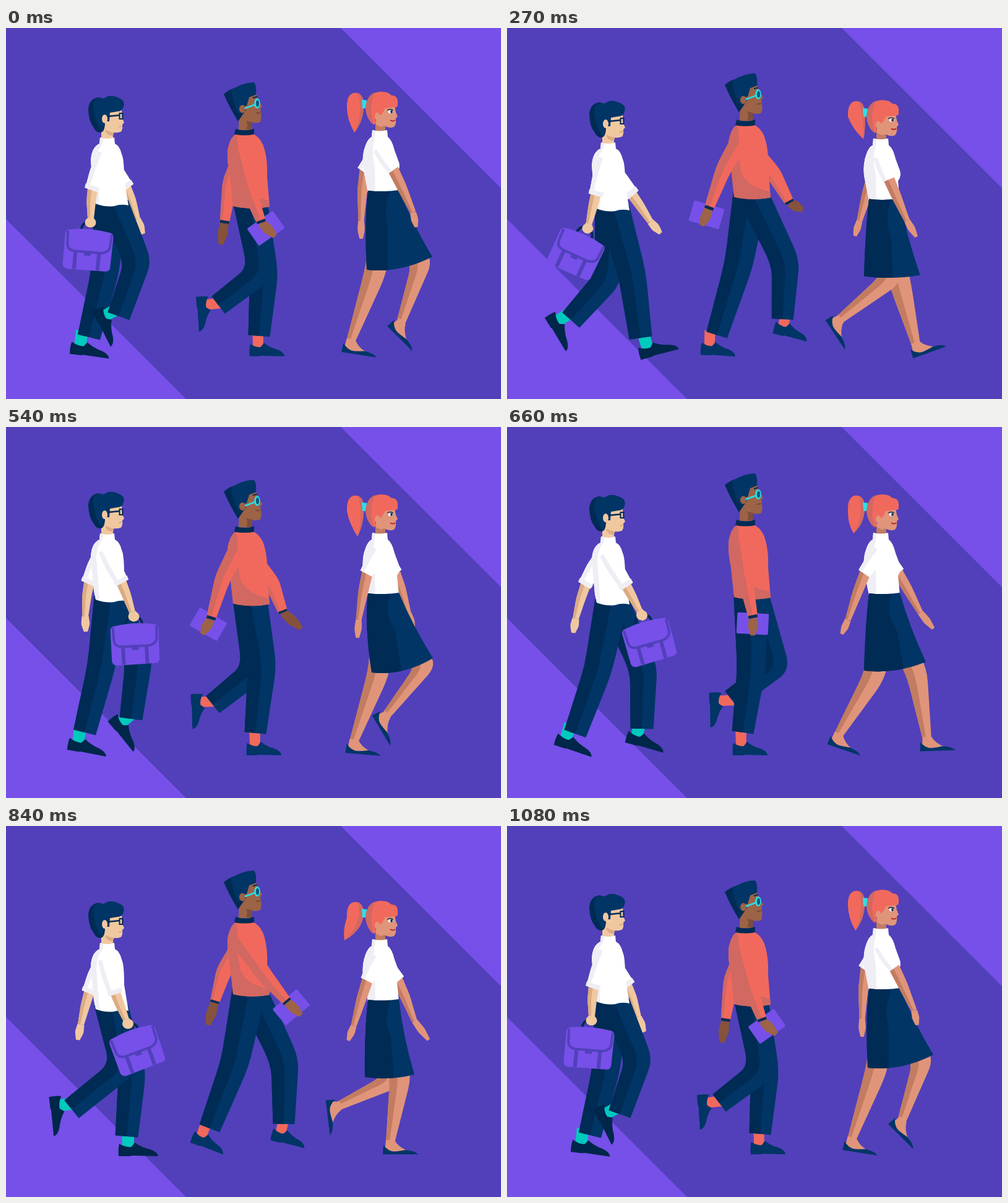
These frames come from a looping animation (800x600 px, 1.11 s). An HTML page with a canvas:

```html
<!DOCTYPE html>
<html lang="en">
<head>
<meta charset="utf-8">
<title>Walkers</title>
<style>
html, body { margin: 0; width: 100%; height: 100%; overflow: hidden; background: #5140ba; }
canvas { display: block; width: 800px; height: 600px; }
</style>
</head>
<body>
<canvas id="stage" width="800" height="600"></canvas>
<script>
const ctx = document.getElementById('stage').getContext('2d');
const STEP = 30, LOOP = 1110, CYCLE = 1080;
const TIMES = [0, 150, 390, 540, 660, 840];
const NAVY = '#003566', DARK = '#002b55', CORAL = '#f1695d', CORAL_DIM = '#d16862';
const VIOLET = '#7650e9', BG = '#5140ba', WHITE = '#ffffff', GREY = '#efeef4', CYAN = '#2ae0e8';

// Leg rows: knee x y, hem x y, ankle x y, foot angle
// Arm rows: elbow x y, wrist x y, fingertip x y
const man = {
  bob: [[0], [3], [9], [-5], [0], [12]],
  near: [
    [213, 378, 182, 466, 169, 460, 62], [210, 388, 238, 493, 248, 496, -11],
    [187, 403, 170, 501, 168, 508, 0], [154, 388, 127, 494, 118, 499, 10],
    [147, 393, 110, 496, 98, 494, 18], [188, 392, 106, 458, 97, 450, 83]],
  far: [
    [160, 395, 134, 500, 121, 503, 7], [148, 393, 110, 497, 97, 494, 18],
    [186, 412, 122, 453, 111, 449, 86], [215, 376, 202, 472, 194, 471, 50],
    [221, 391, 218, 488, 212, 489, 15], [204, 400, 195, 502, 197, 508, 0]],
  nearArm: [
    [138, 262, 137, 308, 136, 321], [137, 263, 126, 309, 122, 324],
    [157, 273, 154, 319, 152, 334], [188, 252, 204, 299, 209, 314],
    [194, 258, 214, 297, 222, 312], [177, 272, 194, 313, 200, 327]],
  farArm: [
    [197, 259, 212, 309, 222, 333], [202, 260, 236, 302, 253, 320],
    [190, 275, 203, 322, 215, 344], [132, 253, 128, 306, 129, 331],
    [125, 256, 111, 310, 107, 333], [133, 270, 121, 321, 116, 346]],
  bag: [[5], [27], [13], [-3], [-16], [-20]]
};
const tall = {
  bob: [[0], [-14], [-10], [-2.5], [-13], [-16]],
  near: [
    [411, 396, 343, 448, 334, 446, 85], [452, 376, 396, 447, 386, 447, 65],
    [434, 388, 466, 495, 479, 498, -27], [414, 388, 403, 495, 402, 505, 0],
    [395, 392, 381, 494, 378, 505, 0], [370, 383, 329, 489, 319, 492, 20]],
  far: [
    [417, 398, 409, 498, 407, 505, 0], [389, 390, 366, 494, 359, 504, 0],
    [374, 380, 325, 490, 311, 491, 22], [402, 395, 334, 449, 325, 444, 87],
    [436, 386, 363, 441, 353, 442, 88], [451, 381, 449, 482, 446, 486, 13]],
  nearArm: [
    [391, 256, 413, 315, 435, 337], [362, 235, 354, 303, 355, 331],
    [346, 230, 316, 291, 299, 315], [350, 245, 331, 311, 317, 335],
    [384, 240, 398, 309, 397, 337], [420, 244, 455, 285, 477, 306]],
  farArm: [
    [362, 250, 353, 316, 347, 350], [415, 240, 429, 296, 432, 309],
    [433, 237, 463, 280, 498, 297], [430, 252, 448, 300, 477, 326],
    [390, 240, 388, 290, 388, 312], [352, 235, 337, 286, 326, 322]],
  tablet: [[420, 324, -35], [354, 313, -9], [311, 299, 34], [327, 319, 30], [397, 318, 3], [461, 293, -40]]
};
const woman = {
  bob: [[0], [10], [13], [6], [6], [18]],
  near: [
    [597, 395, 557, 507, 557, 507, 9], [586, 402, 523, 499, 523, 499, 20],
    [664, 402, 570, 451, 570, 451, 84], [680, 384, 614, 467, 614, 467, 59],
    [662, 395, 679, 505, 679, 505, -2], [638, 405, 621, 512, 621, 512, 0]],
  far: [
    [673, 378, 638, 477, 638, 477, 45], [656, 410, 702, 505, 702, 505, -22],
    [616, 408, 596, 512, 596, 512, 0], [602, 398, 562, 509, 562, 509, 5],
    [594, 402, 535, 499, 535, 499, 19], [625, 412, 537, 453, 537, 453, 83]],
  nearArm: [
    [627, 229, 658, 298, 663, 322], [630, 239, 674, 302, 695, 324],
    [600, 246, 606, 318, 610, 349], [582, 237, 570, 312, 568, 341],
    [577, 237, 551, 312, 541, 335], [583, 250, 562, 323, 553, 347]],
  farArm: [
    [577, 232, 574, 312, 574, 341], [576, 238, 547, 312, 536, 342],
    [607, 246, 609, 310, 610, 330], [631, 237, 650, 300, 659, 327],
    [633, 236, 668, 300, 689, 326], [635, 250, 660, 315, 683, 346]],
  // hem left, hem right, shade line at hem
  skirt: [
    [583, 391, 689, 370, 617], [568, 396, 668, 393, 611], [590, 404, 676, 395, 640],
    [591, 397, 690, 374, 642], [577, 394, 677, 380, 644], [580, 406, 660, 402, 628]],
  tail: [[563, 169], [572, 176], [576, 181], [568, 177], [560, 172], [547, 185]]
};

// Periodic cubic interpolation through the key poses
function at(rows, ms) {
  const n = TIMES.length;
  const time = i => TIMES[(i + n) % n] + Math.floor(i / n) * CYCLE;
  let k = n - 1;
  while (TIMES[k] > ms) k--;
  const row = i => rows[(i + n) % n];
  const h = time(k + 1) - time(k), u = (ms - time(k)) / h;
  return rows[0].map((_, c) => {
    const slope = i => (row(i + 1)[c] - row(i)[c]) / (time(i + 1) - time(i));
    const tangent = i => {
      const a = time(i) - time(i - 1), b = time(i + 1) - time(i);
      return (b * slope(i - 1) + a * slope(i)) / (a + b);
    };
    const p = row(k)[c], q = row(k + 1)[c], v = 1 - u;
    return p * (1 + 2 * u) * v * v + q * u * u * (3 - 2 * u)
      + h * u * v * (tangent(k) * v - tangent(k + 1) * u);
  });
}

function fill(path, color) {
  ctx.fillStyle = color;
  ctx.fill(typeof path === 'string' ? new Path2D(path) : path);
}
function line(path, color, width) {
  ctx.strokeStyle = color;
  ctx.lineWidth = width;
  ctx.stroke(new Path2D(path));
}
function oval(x, y, rx, ry, color) {
  ctx.beginPath();
  ctx.ellipse(x, y, rx, ry, 0, 0, 7);
  ctx.fillStyle = color;
  ctx.fill();
}
function placed(x, y, deg, draw) {
  ctx.save();
  ctx.translate(x, y);
  ctx.rotate(deg * Math.PI / 180);
  draw();
  ctx.restore();
}
const mix = (a, b, u) => [a[0] + (b[0] - a[0]) * u, a[1] + (b[1] - a[1]) * u];
function normal(a, b) {
  const dx = b[0] - a[0], dy = b[1] - a[1], d = Math.hypot(dx, dy) || 1;
  return [dy / d, -dx / d];
}

// Tapered three-point limb; from and to run from -0.5 (back) to 0.5 (front)
function limb(p, w, from, to, color, flatTop) {
  const n1 = normal(p[0], p[1]), n2 = normal(p[1], p[2]);
  const sum = [n1[0] + n2[0], n1[1] + n2[1]], d = Math.hypot(...sum) || 1;
  const ns = [flatTop ? [1, 0] : n1, [sum[0] / d, sum[1] / d], n2];
  const edge = s => p.map((q, i) => [q[0] + ns[i][0] * w[i] * s, q[1] + ns[i][1] * w[i] * s]);
  const a = edge(from), b = edge(to).reverse();
  ctx.beginPath();
  ctx.moveTo(...a[0]);
  for (const e of [a, b]) {
    ctx.lineTo(...e[0]);
    ctx.lineTo(...mix(e[0], e[1], 0.8));
    ctx.quadraticCurveTo(...e[1], ...mix(e[1], e[2], 0.2));
    ctx.lineTo(...e[2]);
  }
  ctx.fillStyle = color;
  ctx.fill();
}

const SHOE = 'M-14,6 Q-4,12 6,11 L11,4 Q22,12 36,15 Q48,19 49,26 L6,25 L4,26 L-15,26 Q-16,14 -14,6Z';
const SOCK = 'M-10,-14 L10,-14 L10,6 Q0,18 -9,9Z';

function leg(row, hip, look, shade) {
  const [kx, ky, hx, hy, ax, ay, deg] = row;
  const pts = [hip, [kx, ky], [hx, hy]];
  const trousers = () => {
    limb(pts, look.width, -0.5, 0.5, look.light, true);
    limb(pts, look.width, -0.5, shade, look.dark, true);
  };
  const foot = () => placed(ax, ay, deg, look.foot);
  if (look.bare) { trousers(); foot(); } else { foot(); trousers(); }
}

function hand(wrist, tip, color, width) {
  limb([wrist, mix(wrist, tip, 0.5), tip], [width * 0.8, width, width * 0.45], -0.5, 0.5, color);
}

// Short sleeve, bare forearm
function shortArm(row, shoulder, look) {
  const elbow = row.slice(0, 2), wrist = row.slice(2, 4), tip = row.slice(4);
  const start = mix(elbow, shoulder, 0.15), mid = mix(elbow, wrist, 0.4);
  const fore = [start, mid, wrist];
  limb(fore, look.fore, -0.5, 0.5, look.skin);
  limb(fore, look.fore, -0.5, -0.1, look.skinDim);
  hand(wrist, tip, look.skin, look.hand);
  const sleeve = [shoulder, mix(shoulder, elbow, 0.5), elbow];
  limb(sleeve, look.sleeve, -0.5, 0.5, WHITE);
  limb(sleeve, look.sleeve, -0.5, -0.2, GREY);
  if (look.cuff) {
    const top = mix(elbow, shoulder, 0.12);
    limb([top, mix(top, elbow, 0.5), elbow], [24, 24, 23], -0.5, 0.5, GREY);
  }
}

// Long sleeve with a dark cuff
function longArm(row, shoulder, skin, shade) {
  const elbow = row.slice(0, 2), wrist = row.slice(2, 4), tip = row.slice(4);
  hand(wrist, tip, skin, 17);
  const pts = [shoulder, elbow, wrist], w = [30, 25, 15];
  limb(pts, w, -0.5, 0.5, CORAL);
  limb(pts, w, -0.5, shade, CORAL_DIM);
  const top = mix(wrist, elbow, 0.07);
  limb([top, mix(top, wrist, 0.5), wrist], [15, 15, 15], -0.5, 0.5, DARK);
}

function shifted(dy, draw) { placed(0, dy, 0, draw); }

const manLeg = {
  width: [55, 45, 37], light: NAVY, dark: DARK,
  foot() { fill(SOCK, '#00c9bd'); fill(SHOE, '#00264a'); }
};
const tallLeg = {
  width: [56, 46, 35], light: NAVY, dark: DARK,
  foot() { ctx.scale(0.88, 1); fill(SOCK, CORAL); fill(SHOE, NAVY); }
};
const womanLeg = {
  width: [36, 35, 14], light: '#e0957a', dark: '#c27c62', bare: true,
  foot() {
    fill('M-7,-4 L7,-4 Q12,6 27,13 L-9,15Z', '#e0957a');
    fill('M-11,4 Q-4,14 8,15 L24,12 Q40,13 45,19 L-12,19Z', NAVY);
  }
};
const manArm = { sleeve: [22, 26, 21], fore: [17, 15, 10], hand: 14, skin: '#f0c8a0', skinDim: '#dbab84', cuff: true };
const womanArm = { sleeve: [20, 24, 21], fore: [18, 16, 9], hand: 12, skin: '#e0957a', skinDim: '#c27c62' };

function bag() {
  line('M-14,14 Q-13,0 -2,-1 Q12,0 13,14', DARK, 4);
  fill('M-32,14 Q0,8 33,14 Q39,15 39,22 L38,71 Q37,77 30,77 L-31,78 Q-38,77 -39,71 L-39,20 Q-38,14 -32,14Z', VIOLET);
  ctx.lineJoin = 'round';
  line('M-35,16 L-34,38 Q-33,47 -22,48 L22,48 Q33,46 35,38 L36,16', BG, 4);
  line('M-20,49 L-20,77 M18,49 L18,77', BG, 6);
  fill('M-6,47 h11 v7 h-11Z', BG);
}

function drawMan(ms) {
  const [dy] = at(man.bob, ms), arm = at(man.nearArm, ms);
  const hip = [170, 278 + dy];
  shortArm(at(man.farArm, ms), [156, 203 + dy], manArm);
  leg(at(man.far, ms), hip, manLeg, 0);
  leg(at(man.near, ms), hip, manLeg, 0);
  shifted(dy, () => {
    fill('M154,158 H173 V179 H154Z', '#f0c8a0');
    fill('M160,165 L175,168 L173,174 Q163,175 160,165Z', '#dbab84');
    fill('M152,177 Q164,181 175,177 L176,187 Q184,191 187,204 Q191,212 191,245 L198,287 Q186,284 175,288 Q160,290 145,284 L142,270 L137,215 Q138,193 151,187Z', WHITE);
    fill('M152,177 L157,178 L156,187 Q147,196 146,216 L151,286 L145,284 L142,270 L137,215 Q138,193 151,187Z', GREY);
    fill('M160,135 L187,133 L188,146 L191,153 L188,156 Q189,166 185,168 Q176,171 166,167 L157,157Z', '#f0c8a0');
    fill('M150,112 Q134,114 133,132 Q134,152 141,160 Q146,170 153,169 Q160,168 160,152 L165,138 L168,120Z', DARK);
    fill('M142,118 Q149,111 158,114 Q168,106 182,113 Q193,117 190,127 Q188,135 180,135 L168,137 L167,151 L159,151 Q157,160 156,168 Q145,156 143,138 Q139,128 142,118Z', NAVY);
    oval(159.5, 147, 4.5, 7, '#f0c8a0');
    line('M164,143 L184,141', DARK, 2.5);
    line('M183.5,138 H188.5 V147 H183.5Z', DARK, 2);
    line('M182,160 L187,159', '#c78f6d', 1.2);
  });
  const grip = mix(arm.slice(2, 4), arm.slice(4), 0.5);
  placed(...grip, at(man.bag, ms)[0], bag);
  shortArm(arm, [159, 203 + dy], manArm);
  oval(...grip, 9, 8, manArm.skin);
}

function drawTall(ms) {
  const [dy] = at(tall.bob, ms), hip = [394, 278 + dy];
  longArm(at(tall.farArm, ms), [385, 200 + dy], '#85523c', -0.25);
  leg(at(tall.far, ms), hip, tallLeg, 0);
  leg(at(tall.near, ms), hip, tallLeg, 0);
  shifted(dy, () => {
    fill('M371,172 H401 Q414,180 418,197 Q423,215 422,240 L426,289 Q396,295 367,288 L362,240 Q355,205 360,190 Q364,176 371,172Z', CORAL);
    fill('M371,172 Q377,182 373,215 L379,250 Q390,273 425,279 L426,289 Q396,295 367,288 L362,240 Q355,205 360,190 Q364,176 371,172Z', CORAL_DIM);
    fill('M388,112 L404,107 L408,117 L414,127 L411,131 Q414,145 411,152 Q404,155 395,152 L396,165 H376 L377,130 Q384,120 388,112Z', '#9c6347');
    fill('M388,150 L398,152 L397,165 L388,163 Q392,158 388,150Z', '#7f4e39');
    fill('M352,107 Q360,99 374,96 L388,132 L375,151 Q361,128 352,107Z', DARK);
    fill('M364,100 Q384,88 400,88 Q405,90 404,108 L393,112 L389,126 L381,126 L377,140 Q367,124 364,100Z', NAVY);
    oval(382, 131, 5, 6.5, '#9c6347');
    line('M399,113 L406,111', DARK, 2);
    line('M386,130 L402,124', CYAN, 2.5);
    oval(406, 122, 4.8, 8, CYAN);
    oval(406.5, 122, 2.6, 5.5, '#075b7c');
    line('M404,138 L411,137', '#70412f', 1.5);
    fill('M371,163 Q386,168 401,163 L401,172 Q386,175 369,172Z', DARK);
  });
  const [x, y, deg] = at(tall.tablet, ms);
  placed(x, y, deg, () => {
    ctx.beginPath();
    ctx.roundRect(-25.5, -17, 51, 34, 2);
    ctx.fillStyle = VIOLET;
    ctx.fill();
  });
  longArm(at(tall.nearArm, ms), [376, 198 + dy], '#9c6347', 0);
}

function skirt(ms, dy) {
  const [lx, ly, rx, ry, sx] = at(woman.skirt, ms), top = 263 + dy;
  const low = Math.max(ly, ry) + 6;
  const shape = new Path2D(`M585,${top} Q610,${top + 3} 635,${top - 1}
    Q${(635 + rx) / 2 - 6},${(top + ry) / 2 - 2} ${rx},${ry}
    Q${(lx + rx) / 2},${low} ${lx},${ly} Q579,${top + 52} 585,${top}Z`);
  fill(shape, NAVY);
  ctx.save();
  ctx.clip(shape);
  fill(`M560,${top - 5} H624 Q608,${top + 30} ${(616 + sx) / 2},${top + 60} L${sx},${low + 10} H560Z`, DARK);
  ctx.restore();
}

function drawWoman(ms) {
  const [dy] = at(woman.bob, ms), hip = [612, 300 + dy];
  const [tx, ty] = at(woman.tail, ms);
  shortArm(at(woman.farArm, ms), [604, 194 + dy], womanArm);
  leg(at(woman.far, ms), hip, womanLeg, -0.1);
  leg(at(woman.near, ms), hip, womanLeg, -0.1);
  const side = (tx + 551) / 2 - 5;
  fill(`M578,${118 + dy} Q573,${103 + dy} 562,${105 + dy} Q550,${108 + dy} 551,${130 + dy} Q${side},${150 + dy} ${tx},${ty} Q580,${148 + dy} 578,${118 + dy}Z`, CORAL);
  fill(`M578,${118 + dy} Q576,${108 + dy} 569,${105 + dy} Q578,${138 + dy} ${tx},${ty} Q580,${148 + dy} 578,${118 + dy}Z`, CORAL_DIM);
  shifted(dy, () => {
    fill('M597,150 H613 V168 H597Z', '#c27c62');
    fill('M592,165 Q604,168 616,165 L617,176 Q624,181 628,198 L635,217 Q638,226 632,234 L635,266 H585 L577,225 Q575,205 581,190 Q585,179 591,176Z', WHITE);
    fill('M592,165 L597,166 L596,178 Q590,195 596,225 L597,266 H585 L577,225 Q575,205 581,190 Q585,179 591,176Z', GREY);
    fill('M598,130 L628,125 L630,136 L633,143 L630,146 Q631,156 627,160 Q620,163 611,158 L606,160 L598,156Z', '#e0957a');
    fill('M575,116 L583,117 L582,130 L576,130Z', CYAN);
    fill('M594,156 Q583,150 582,126 Q586,104 606,103 Q618,103 623,109 Q634,109 633,122 Q634,129 628,128 L612,130 Q609,140 604,141 Q596,143 597,155Z', CORAL);
    fill('M594,156 Q581,146 581,127 Q584,108 597,104 Q585,125 594,156Z', CORAL_DIM);
    oval(600, 143, 4, 6, '#e0957a');
    oval(621.5, 135.5, 3.8, 2.6, WHITE);
    oval(623, 135.5, 1.8, 2.4, DARK);
    line('M616,133 Q621,130 626,133', DARK, 1.4);
    line('M621,149 Q625,152 629,149', '#b8262f', 2);
  });
  skirt(ms, dy);
  shortArm(at(woman.nearArm, ms), [602, 194 + dy], womanArm);
}

function draw(now) {
  const ms = Math.floor((now % LOOP) / STEP) * STEP % CYCLE;
  ctx.fillStyle = BG;
  ctx.fillRect(0, 0, 800, 600);
  fill('M541,0 H800 V259Z M0,309 L291,600 H0Z', VIOLET);
  drawMan(ms);
  drawTall(ms);
  drawWoman(ms);
}

const start = performance.now();
function tick() {
  draw(performance.now() - start);
  requestAnimationFrame(tick);
}
tick();
</script>
</body>
</html>
```
